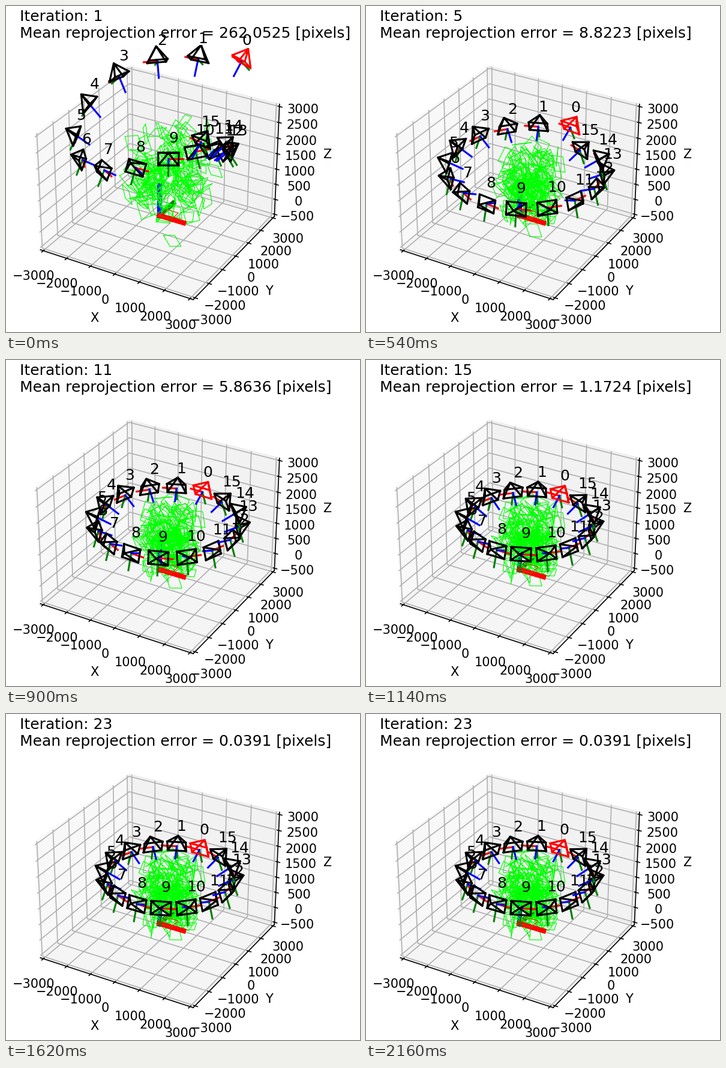
Write a matplotlib script that moves like this. It is 590x544 px and loops after 2.22 s.

```python
import numpy as np
import matplotlib.pyplot as plt
from matplotlib.animation import FuncAnimation

W, H, DPI = 590, 544, 150
FRAMES, STEP_MS = 37, 60
LEAD, LAST = 4, 23            # frames held at the start, last iteration
N_CAMS, N_SQUARES = 16, 150

# Camera ring, in world units
CENTER = np.array([250, 250, 1500])
AIM = np.array([250, 250, 500])
RADIUS = 2250
AXIS = 500
RIGHT = np.array([np.cos(np.pi / 6), 0.5, 0])   # horizontal screen direction
UP = np.array([0, 0, 1])
UNITS_RIGHT, UNITS_UP = 21.5, 19.3              # world units per screen pixel

# How far the ring is blown up (pixels) as the solve goes on
KEYS = [1, 2, 5, 11, 15]
GROW_X = [24, 40, 24, 13, 0]
GROW_Y = [24, 38, 15, 6, 0]
ERROR_AT = [1, 2, 5, 11, 19, 23]
ERROR = [262.0525, 69.3459, 8.8223, 5.8636, 0.2344, 0.0391]

# A ball of randomly turned squares
rng = np.random.default_rng(11)


def unit(v):
    return v / np.linalg.norm(v, axis=-1, keepdims=True)


spots = (np.array([250, 250, 950]) + unit(rng.normal(size=(N_SQUARES, 3)))
         * 1250 * np.sqrt(rng.random((N_SQUARES, 1))))
noise = rng.uniform(-1, 1, (N_SQUARES, 3)) * (950, 950, 500)
turns = rng.normal(size=(N_SQUARES, 3, 3))
wobble = rng.normal(0, 0.4, (N_SQUARES, 3, 3))
CORNERS = np.array([(-1, -1), (1, -1), (1, 1), (-1, 1), (-1, -1)]) * 250
GAP = np.full(3, np.nan)


def lift(k):
    """Fast-fading upward error, 1 at the first iteration."""
    return 0.27 ** (k - 1)


def squares(k):
    spread = np.clip((15 - k) / 4, 0, 1) / k
    mid = spots + noise * spread + UP * 350 * lift(k)
    m = turns + wobble * spread
    a = unit(m[:, 0])
    b = unit(np.cross(a, m[:, 1]))
    pts = (mid[:, None] + CORNERS[None, :, :1] * a[:, None]
           + CORNERS[None, :, 1:] * b[:, None])
    gaps = np.full((N_SQUARES, 1, 3), np.nan)
    return np.concatenate([pts, gaps], axis=1).reshape(-1, 3)


def drift(i, k):
    """Screen offset (right, up) in pixels of camera i at iteration k."""
    turn = 2 * np.pi * i / N_CAMS
    phi = turn + np.pi / 3
    seam = 45 * 0.7 ** (k - 1) * (np.exp(-i) - np.exp(i + 1 - N_CAMS))
    wave = 0.35 ** (k - 1)
    dx = (np.interp(k, KEYS, GROW_X) * (np.cos(phi) - 0.2)
          + 20 * wave * np.cos(2 * turn - 0.68) + seam)
    dy = (np.interp(k, KEYS, GROW_Y) * np.sin(phi)
          + 33 * wave * np.sin(2 * turn) + seam + 66 * lift(k))
    return dx, dy


def camera_pose(i, k):
    """Position and x, y, z axes of camera i at iteration k."""
    ang = np.pi / 2 + 2 * np.pi * i / N_CAMS
    dx, dy = drift(i, k)
    pos = (CENTER + RADIUS * np.array([np.cos(ang), np.sin(ang), 0])
           + RIGHT * dx * UNITS_RIGHT + UP * dy * UNITS_UP)
    z = unit(AIM - pos)
    x = unit(np.cross(-UP, z))
    return pos, x, np.cross(z, x), z


def camera_body(pos, x, y, z):
    a, b, c, d = (pos + sx * 345 * x + sy * 190 * y
                  for sx, sy in ((-1, -1), (1, -1), (1, 1), (-1, 1)))
    tip = pos - 440 * z
    return np.array([a, b, c, d, a, tip, c, GAP, b, tip, d])


def put(line, pts):
    line.set_data_3d(*np.asarray(pts).T)


LEFT, BOTTOM, SIDE = 23, 25.4, 453.5
fig = plt.figure(figsize=(W / DPI, H / DPI), dpi=DPI, facecolor="white")
ax = fig.add_axes([LEFT / W, BOTTOM / H, SIDE / W, SIDE / H], projection="3d")
ax.view_init(elev=30, azim=-60)
pad = 3500 / 48
ax.set(xlim=(-3125, 3125), ylim=(-3125, 3125), zlim=(-500 - pad, 3000 + pad),
       xlabel="X", ylabel="Y", zlabel="Z")
ax.set_xticks(range(-3000, 3001, 1000))
ax.set_yticks(range(-3000, 3001, 1000))
ax.set_zticks(range(-500, 3001, 500))
title = fig.text(LEFT / W, (BOTTOM + SIDE + 12.5) / H, "",
                 fontsize=12, va="baseline")


def new_line(color, lw=1.5):
    return ax.plot([], [], [], color=color, lw=lw)[0]


def world_axis(color, tip):
    put(new_line(color, 4), [(0, 0, 0), tip])


# The x axis lies nearest the viewer, so it goes over the squares
world_axis("green", (0, 1000, 0))
world_axis("blue", (0, 0, 1000))
cloud = new_line("lime", 0.55)
world_axis("red", (1000, 0, 0))
put(new_line((0.72, 0.3, 0), 0.6),
    [(0, 0, 0), (500, 0, 0), (500, 500, 0), (0, 500, 0), (0, 0, 0)])

cams = []
for i in range(N_CAMS):
    axes = [new_line(c) for c in ("red", "green", "blue")]
    body = new_line("black" if i else "red")
    cams.append((axes, body, ax.text(0, 0, 0, str(i), fontsize=12)))


def update(frame):
    k = min(max(frame - LEAD, 1), LAST)
    err = np.exp(np.interp(k, ERROR_AT, np.log(ERROR)))
    title.set_text(f"Iteration: {k}\n"
                   f"Mean reprojection error = {err:.4f} [pixels]")
    put(cloud, squares(k))
    for i, (axes, body, label) in enumerate(cams):
        pos, *dirs = camera_pose(i, k)
        for line, d in zip(axes, dirs):
            put(line, [pos, pos + AXIS * d])
        put(body, camera_body(pos, *dirs))
        label.set_position_3d(pos + AXIS * UP)
    return []


anim = FuncAnimation(fig, update, frames=FRAMES, interval=STEP_MS,
                     repeat=True, repeat_delay=0, blit=False)
plt.show()
```
